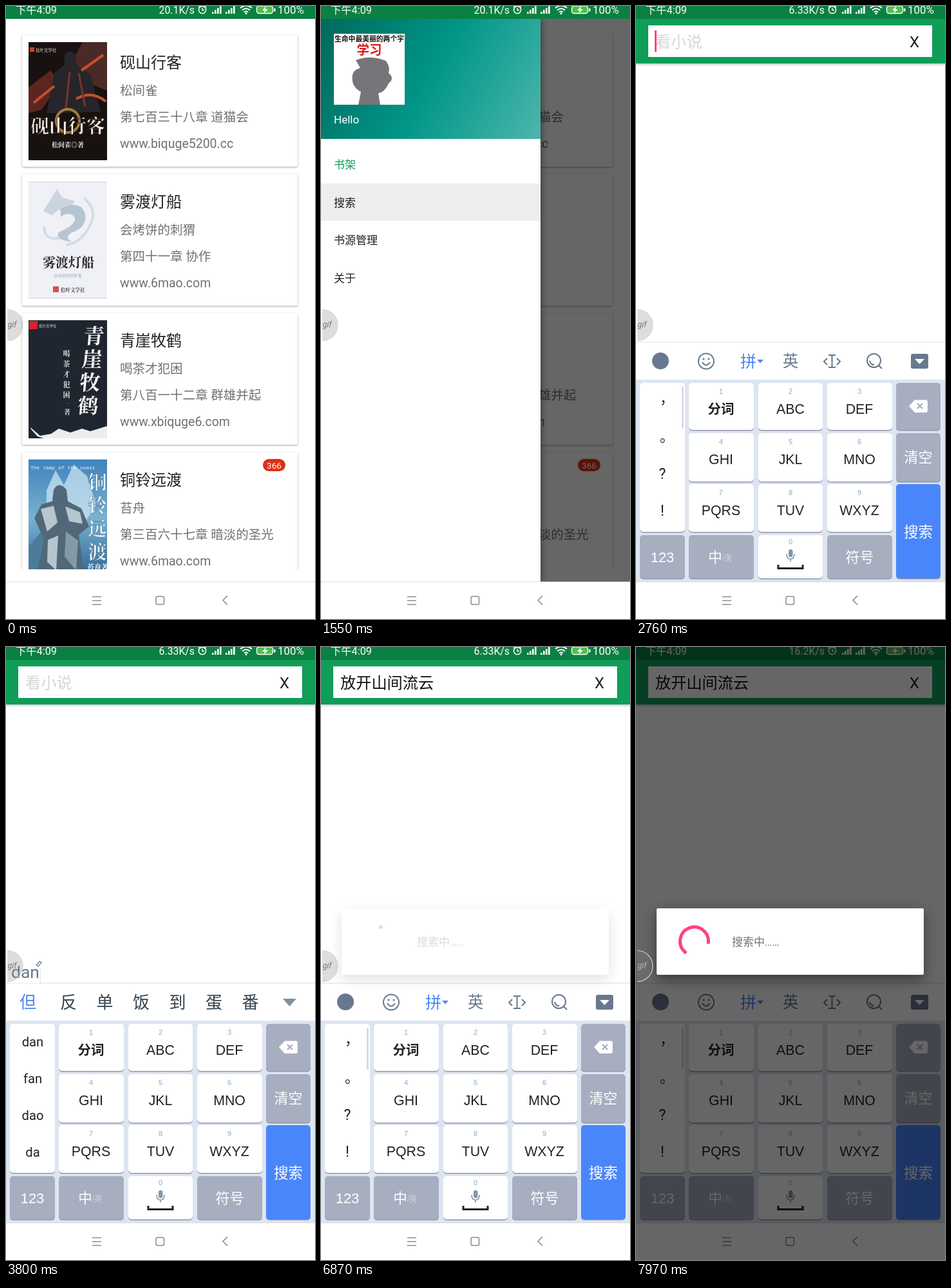
Write an HTML page that moves like this. It is 480 px wide and 950 px high and loops after 8 s.

```html
<!DOCTYPE html>
<html lang="zh">
<head>
<meta charset="utf-8">
<title>Reader</title>
<style>
html, body { margin: 0; width: 100%; height: 100%; overflow: hidden; background: #fff; }
svg { display: block; }
#stage { position: absolute; left: 0; top: 0; font-family: Roboto, "Noto Sans CJK SC", "Noto Sans CJK", sans-serif; }
.card { filter: drop-shadow(0 1px 1.5px rgba(0,0,0,.36)); }
.serif { font-family: "Noto Serif", "Noto Serif CJK SC", "Noto Sans CJK SC", serif; font-weight: 700; }
.mono { font-family: "Liberation Mono", monospace; }
.keys { font-family: "Liberation Sans", "Noto Sans CJK SC", sans-serif; }
.dialog { filter: drop-shadow(0 7px 10px rgba(0,0,0,.45)); }
.bar { filter: drop-shadow(0 1px 2px rgba(0,0,0,.35)); }
.side { filter: drop-shadow(2px 0 5px rgba(0,0,0,.4)); }
</style>
</head>
<body>
<svg id="stage" width="480" height="950" viewBox="0 0 480 950"></svg>
<script>
const LOOP = 8000;
const GREEN = '#0f9d58', PINK = '#ff4081', SLATE = '#68788e', BLUE = '#4a86fb', GREY = '#a7aec0';
const QUERY = '放开山间流云';
const DRAWER = 341;

// moments at which the screen is refreshed: from, to, count
const SPANS = [[0, 0, 1], [200, 680, 6], [1450, 1880, 6], [1960, 2160, 3], [2270, 2270, 1],
  [2550, 2760, 3], [3040, 3330, 4], [3490, 4290, 10], [4470, 4470, 1], [4870, 4870, 1],
  [5190, 5240, 2], [5740, 5900, 3], [6380, 6470, 3], [6870, 7670, 9], [7770, 7970, 3]];
const TICKS = SPANS.flatMap(([a, b, n]) =>
  Array.from({ length: n }, (_, i) => n < 2 ? a : Math.round(a + (b - a) * i / (n - 1))));

// press time, key, composition, candidates, syllables
const TYPED = [
  [3040, 'DEF', 'd', '的 到 大 等 都 多 对', 'd e f'],
  [3490, 'ABC', 'da', '大 打 发 达 法 答 额', 'da fa e d'],
  [3660, 'MNO', 'dan', '但 反 单 饭 到 蛋 番', 'dan fan dao da'],
  [3840, 'GHI', 'dang', '当 放 方 房 党 挡 防', 'dang fang dan dao'],
  [4020, 'JKL', "fang'k", '放开 方块 房卡 放宽 反抗', 'dang fang dan dao'],
  [4200, 'ABC', "fang'ka", '放开 房卡 翻来 单卡 方卡', 'dang fang dan dao'],
  [4290, 'GHI', "fang'kai", '放开 翻来 房开 方凯 单开', 'dang fang dan dao']
];

const clamp = x => Math.max(0, Math.min(1, x));
const easeOut = x => 1 - (1 - clamp(x)) ** 3;
const within = (t, a, b) => t >= a && t < b;
const text = (x, y, size, fill, s, more = '') =>
  `<text x="${x}" y="${y}" font-size="${size}" fill="${fill}" ${more}>${s}</text>`;
const mid = (x, y, size, fill, s, more = '') => text(x, y, size, fill, s, 'text-anchor="middle" ' + more);
const rect = (x, y, w, h, fill, more = '') =>
  `<rect x="${x}" y="${y}" width="${w}" height="${h}" fill="${fill}" ${more}/>`;
const path = (d, fill, more = '') => `<path d="${d}" fill="${fill}" ${more}/>`;
const line = (d, color, w = 2, more = '') => path(d, 'none', `stroke="${color}" stroke-width="${w}" ${more}`);
const circle = (x, y, r, fill, more = '') => `<circle cx="${x}" cy="${y}" r="${r}" fill="${fill}" ${more}/>`;
const column = (x, y, gap, size, fill, s, more = '') =>
  [...s].map((c, i) => mid(x, y + i * gap, size, fill, c, more)).join('');

// fast-out-slow-in, bezier (.4, 0, .2, 1)
function smooth(x) {
  let lo = 0, hi = 1;
  for (let i = 0; i < 24; i++) {
    const u = (lo + hi) / 2, v = 1 - u;
    if (1.2 * u * v * v + .6 * u * u * v + u * u * u < x) lo = u; else hi = u;
  }
  return lo * lo * (3 - 2 * lo);
}

const COVERS = [
  rect(0, 0, 122, 183, '#17110f') +
  path('M122 0V75L88 62L70 25L84 0Z', '#4a2a26') +
  path('M0 70L34 44L50 62L20 105L0 110Z', '#5c2620') +
  path('M28 110L40 48L55 36L56 20Q64 8 73 20L74 36L96 50L112 108Z', '#25252b') +
  line('M8 94L40 68M82 44L116 20M74 88Q98 74 120 92', '#c8502b', 4) +
  line('M64 46L58 104M78 48L88 100', '#77352b', 3) +
  circle(61, 122, 18, 'none', 'stroke="#a5793f" stroke-width="4"') +
  rect(2, 8, 7, 7, '#d33a2c') + text(11, 14.5, 6.5, '#e5d5b4', '拾叶文学社') +
  mid(61, 141, 29, '#f8f2ea', '砚山行客', 'class="serif" stroke="#2b1712" stroke-width=".7"') +
  mid(61, 163, 10, '#eee', '松间雀◎著', 'class="serif"'),

  rect(0, 0, 122, 183, '#eff1f6') + rect(0, 0, 122, 2, '#dfe3ea') + rect(0, 180, 122, 2, '#e1e4ea') +
  path('M23 46L34 29L44 12L52 25L72 31L64 43L46 45L36 53Z', '#cbd5df') +
  path('M50 42Q82 28 88 51Q91 72 68 79Q54 88 68 94Q39 91 47 79Q82 64 68 52Q57 48 50 56Z', '#b7c5d1') +
  line('M86 26Q106 44 98 63Q85 95 58 99M24 70Q24 92 48 88', '#d3dce5', 4) +
  mid(62, 133, 20, '#222', '雾渡灯船', 'class="serif"') +
  mid(61, 148, 6, '#aaaeb6', '会烤饼的刺猬 著') +
  rect(38, 163, 9, 9, '#cf5149') + text(50, 171, 7.5, '#444', '拾叶文学社', 'class="serif"'),

  rect(0, 0, 122, 183, '#20262f') +
  rect(1, 1, 13, 13, '#d9202a') + text(16, 11, 5.5, '#d6d8dc', '拾叶文学社') +
  column(96, 36, 36, 32, '#f6f6f6', '青崖牧鹤', 'class="serif" transform="skewX(-5) translate(8 0)"') +
  column(59, 56, 16, 11, '#e1e1e1', '喝茶才犯困', 'class="serif"') +
  mid(60, 132, 9, '#ddd', '·') + mid(60, 146, 10, '#ddd', '著', 'class="serif"') +
  path('M3 166L18 179L35 176L47 168L65 174L83 168L96 172L122 164V183H23L14 180L4 169Z', '#eceeee'),

  rect(0, 0, 122, 183, 'url(#sky)') +
  path('M28 48L42 17L55 40L70 8L91 26L105 70L83 105L28 96Z', '#c9e4ef', 'opacity=".75"') +
  path('M0 135L20 112L42 119L60 183H0Z', '#4c7b99') +
  path('M9 91L20 70L37 65L39 47Q47 33 59 47L61 65L82 76L94 104L78 117L87 183H12L24 125Z', '#526878') +
  path('M19 77L39 72L45 98L29 112ZM57 73L80 82L84 100L63 96ZM30 125L46 118L43 172L29 159Z', '#b5c6cf') +
  path('M58 112L77 126L74 172L56 151Z', '#8299a7') +
  text(3, 15, 8, '#e8f5ff', 'The lamp of the coast', 'class="mono"') +
  column(107, 46, 36, 29, '#f4fbff', '铜铃远渡', 'class="serif" stroke="#457391" stroke-width=".5"') +
  text(91, 171, 11, '#fff', '苔舟著', 'class="serif"')
];
const BOOKS = [
  ['砚山行客', '松间雀', '第七百三十八章 道猫会', 'www.biquge5200.cc'],
  ['雾渡灯船', '会烤饼的刺猬', '第四十一章 协作', 'www.6mao.com'],
  ['青崖牧鹤', '喝茶才犯困', '第八百一十二章 群雄并起', 'www.xbiquge6.com'],
  ['铜铃远渡', '苔舟', '第三百六十七章 暗淡的圣光', 'www.6mao.com']
];

const card = ([title, author, chapter, site], i) => `<g transform="translate(25 ${45 + 215.5 * i})">
  ${rect(0, 0, 428, 204, '#fff', 'rx="2" class="card"')}
  <svg x="10" y="11" width="122" height="183">${COVERS[i]}</svg>
  ${text(152, 51, 24, '#212121', title)}${text(152, 93, 19.5, '#707070', author)}
  ${text(152, 134, 19.5, '#707070', chapter)}${text(152, 175, 19.5, '#707070', site)}</g>`;

// the list has no background of its own, so the page below shows between cards
function shelf() {
  return `<g clip-path="url(#list)">${BOOKS.map(card).join('')}` +
    rect(399, 702, 35, 19, '#df2f17', 'rx="9.5"') + mid(416.5, 716.5, 13.5, '#fff', '366') + '</g>';
}

function searchPage() {
  return rect(0, 20, 480, 873, '#fff') + rect(0, 20, 480, 69, GREEN, 'class="bar"') +
    rect(19, 30, 441, 49, '#fff') + mid(432.5, 64, 24, '#212121', 'X') + '<g id="field"></g>';
}

function drawer() {
  const items = ['书架', '搜索', '书源管理', '关于'];
  return rect(0, 20, DRAWER, 872, '#fff', 'class="side"') + rect(0, 20, DRAWER, 186, 'url(#teal)') +
    rect(20, 43, 110, 110, '#fff') +
    path('M54 84Q76 75 101 85Q108 95 105 104Q115 112 105 120Q99 134 89 135L92 153H58L62 133Q46 125 49 106Q52 98 61 96Z', '#77757a') +
    mid(75, 55, 10.8, '#111', '生命中最美丽的两个字', 'font-weight="700"') +
    mid(75, 75, 19.5, '#e01818', '学习', 'font-weight="700"') +
    text(20, 181.5, 17, '#fff', 'Hello') + rect(0, 275, DRAWER, 58, '#000', 'id="ripple"') +
    items.map((s, i) => text(20, 252 + 58.6 * i, 17, i ? '#212121' : GREEN, s)).join('');
}

const COLS = [[6, 70], [82, 101], [190, 100], [297, 101], [404, 69]];
const ROWS = [[584, 73], [662, 75], [741, 74], [820, 67]];
function keyBox(c, r, fill, span = 1) {
  const [x, w] = COLS[c], y = ROWS[r][0], [y2, h2] = ROWS[r + span - 1];
  const h = y2 + h2 - y;
  return rect(x, y + 1.5, w, h, '#8f99ad', 'rx="5"') + rect(x, y, w, h, fill, 'rx="5"');
}
const LETTERS = ['分词', 'ABC', 'DEF', 'GHI', 'JKL', 'MNO', 'PQRS', 'TUV', 'WXYZ'];

function keyboard() {
  let s = rect(0, 521, 480, 58, '#fff') + rect(0, 520.5, 480, 1, '#d9dee6') + rect(0, 579, 480, 314, '#dde5f1');
  s += keyBox(0, 0, '#fff', 3) + keyBox(4, 0, GREY) + keyBox(4, 1, GREY) + keyBox(4, 2, BLUE, 2);
  s += keyBox(0, 3, GREY) + keyBox(1, 3, GREY) + keyBox(2, 3, '#fff') + keyBox(3, 3, GREY);
  LETTERS.forEach((name, i) => {
    const c = 1 + i % 3, r = Math.floor(i / 3), x = COLS[c][0] + 50, y = ROWS[r][0];
    s += keyBox(c, r, '#fff') + mid(x, y + 16.5, 11, '#98a5bd', i + 1) +
      mid(x, y + 47.5, i ? 21.3 : 20.5, '#222', name, i ? '' : 'font-weight="700"');
  });
  s += path('M424 620L433 610.5H450Q453 610.5 453 613V627Q453 630 450 630H433Z', '#fff') +
    line('M437 616L445 624M445 616L437 624', GREY, 2.2);
  s += mid(438.5, 707, 22, '#fff', '清空') + mid(438.5, 823, 22.5, '#fff', '搜索') +
    mid(41, 861.5, 22, '#fff', '123') + mid(123, 862, 21.5, '#fff', '中', 'font-weight="500"') +
    text(134, 860, 12, '#d0d5df', '/英') + mid(347.5, 862, 22, '#fff', '符号') +
    mid(240, 834, 11, '#98a5bd', '0');
  s += rect(237, 842, 6.5, 12, '#8596ac', 'rx="3.2"') + line('M234 849Q234 857 240 857Q246 857 246 849M240 857V861', '#8596ac', 1.6) +
    line('M221 866V871.5H259V866', '#222', 3);
  return `<g class="keys">${s}</g><g id="press"></g><g id="side"></g><g id="strip"></g>`;
}

const HIDE = rect(427, 539, 27, 23, SLATE, 'rx="3"') + path('M433 547H448L440.5 555Z', '#fff');
const MORE = path('M430 545H451L440.5 557Z', '#7d92a0');
const TOOLS = circle(38, 550, 13, SLATE) +
  circle(109, 550.5, 12, 'none', `stroke="${SLATE}" stroke-width="2"`) +
  circle(105, 547, 1.6, SLATE) + circle(113, 547, 1.6, SLATE) + line('M103 552Q109 561 115 552', SLATE) +
  mid(174.5, 559.5, 25, BLUE, '拼') + path('M188 548H198L193 553.5Z', BLUE) + mid(240, 559, 24.5, SLATE, '英') +
  line('M299 541H310M304.5 541V560M299 560H310M297 546L292 551L297 556M312 546L317 551L312 556', SLATE) +
  circle(369.5, 549.5, 10.5, 'none', `stroke="${SLATE}" stroke-width="2"`) +
  line('M363 550Q364 556 370 556M377 557L382 562', SLATE) + HIDE;

function candidates(list, button) {
  let x = 21;
  return list.split(' ').map((s, i) => {
    const out = text(x, 560, 26, i ? '#34434f' : BLUE, s);
    x += s.length * 26 + (i ? 30.5 : 37);
    return out;
  }).join('') + button;
}

function statusBar() {
  const bars = x => [0, 1, 2, 3].map(i => rect(x + i * 4, 9 - i * 3, 2.6, 3 + i * 3, '#fff')).join('');
  return rect(0, 0, 480, 20, '#0b8043') + text(15, 12, 16.3, '#fff', '下午4:09') +
    text(293, 12, 15.8, '#fff', '', 'id="speed" text-anchor="end"') +
    circle(305, 6, 5.6, 'none', 'stroke="#fff" stroke-width="1.5"') +
    line('M305 3V6.5H308M299 2L302 -1M311 2L308 -1', '#fff', 1.4) + bars(320) + bars(341) +
    line('M364 3Q373 -4 382 3M367 6.5Q373 1.5 379 6.5M370 9.5Q373 7 376 9.5', '#fff', 2) + circle(373, 11.5, 1.5, '#fff') +
    rect(389.5, 0, 25, 11.5, '#4cc04c', 'rx="3.5" stroke="#fff" stroke-width="1.4"') +
    rect(416, 3.5, 2.5, 5, '#fff', 'rx="1"') + path('M404 0L398 7H402L400 12L407 5H403Z', '#fff') +
    text(422, 12, 16.9, '#fff', '100%');
}

function navBar() {
  return rect(0, 892, 480, 58, '#fff') + rect(0, 892, 480, 1, '#ddd') +
    line('M134 915.5H148M134 921.5H148M134 927.5H148', '#8a8a8a', 1.4) +
    rect(233, 915, 12.5, 12.5, 'none', 'rx="2.5" stroke="#8a8a8a" stroke-width="1.5"') +
    line('M344 914L337 921L344 928', '#8a8a8a', 1.5);
}

const stage = document.getElementById('stage');
stage.innerHTML = `<defs>
  <linearGradient id="teal" gradientUnits="userSpaceOnUse" x1="341" y1="206" x2="0" y2="20">
    <stop stop-color="#4db6ac"/><stop offset=".5" stop-color="#009688"/><stop offset="1" stop-color="#00695c"/></linearGradient>
  <linearGradient id="sky" x2="0" y2="1"><stop stop-color="#3f83bd"/><stop offset=".5" stop-color="#78b2d1"/><stop offset="1" stop-color="#2e6492"/></linearGradient>
  <clipPath id="list">${rect(0, 20, 480, 853, '#000')}</clipPath></defs>
  ${rect(0, 0, 480, 950, '#fff')}<g id="search">${searchPage()}</g>
  <g id="shelf">${shelf()}</g>${rect(0, 20, 480, 872, '#000', 'id="scrim"')}
  <g id="drawer">${drawer()}</g><g id="keyboard">${keyboard()}</g>${statusBar()}${navBar()}
  ${rect(0, 0, 480, 950, '#000', 'id="dim"')}
  <g id="dialog">${rect(32, 405, 415, 103, '#fff', 'rx="2" class="dialog"')}
    ${text(149, 463, 17, '#757575', '搜索中……')}${line('', PINK, 5, 'id="arc" stroke-linecap="square"')}</g>
  <path d="M2 470A24.5 24.5 0 0 1 2 519Z" fill="rgba(128,124,128,.26)"/>
  ${line('M2 470.5A24 24 0 0 1 2 518.5', 'rgba(215,215,215,.9)', 1.2)}
  ${text(2.5, 498, 12.5, '#777', 'gif', 'id="gif" font-style="italic"')}`;

const el = {};
stage.querySelectorAll('[id]').forEach(n => el[n.id] = n);
const set = (id, name, value) => el[id].setAttribute(name, value);
const show = (id, on) => set(id, 'visibility', on ? 'visible' : 'hidden');

// swiped open, later settles shut after a tap
function drawerOpen(t) {
  if (t < 1766) return t < 200 ? 0 : smooth(clamp((t - 120) / 560));
  return (1 - clamp((t - 1766) / 512)) ** 5;
}

function drawPages(t) {
  const open = t < 2270 ? drawerOpen(t) : 0, fade = clamp((t - 1830) / 440);
  show('drawer', open > 0);
  set('drawer', 'transform', `translate(${DRAWER * (open - 1)} 0)`);
  set('scrim', 'opacity', .6 * open);
  set('ripple', 'opacity', within(t, 1450, 1880) ? .1 * clamp((t - 1400) / 200) : 0);
  set('shelf', 'opacity', 1 - fade);
  set('search', 'opacity', fade);
}

function drawInput(t) {
  const value = t < 5240 ? '' : t < 5820 ? QUERY.slice(0, 2) : QUERY;
  const blink = [[2550, 3330], [3840, 4290], [4870, 5740], [5820, 6380]].some(([a, b]) => within(t, a, b));
  el.field.innerHTML = text(30, 64, 24.2, value ? '#111' : '#d6d6d6', value || '看小说') +
    (blink ? rect(29 + 24.2 * value.length, 38, 3, 33, PINK) : '');
}

function drawKeyboard(t) {
  const enter = clamp((t - 2490) / 260);
  show('keyboard', t >= 2550);
  set('keyboard', 'opacity', easeOut(enter));
  set('keyboard', 'transform', `translate(0 ${80 * (1 - easeOut(enter))})`);

  let now = null, pressed = '';
  TYPED.forEach((row, i) => {
    const shown = row[0] + (i === TYPED.length - 1 ? 180 : 80);
    if (within(t, shown, 5240)) now = row;
    if (within(t, row[0], shown)) pressed = row[1];
  });

  const shade = (x, y, w, h) => rect(x, y, w, h, '#4a5a78', 'rx="5" opacity=".25"');
  let press = '';
  if (pressed) {
    const i = LETTERS.indexOf(pressed), [x, w] = COLS[1 + i % 3], [y, h] = ROWS[Math.floor(i / 3)];
    press = shade(x, y, w, h);
  }
  if (within(t, 6380, 6470)) press = shade(404, 741, 69, 146);
  el.press.innerHTML = press;

  el.side.innerHTML = now
    ? now[4].split(' ').map((s, i) => mid(41.5, 619 + 57 * i, 20.2, '#222', s)).join('')
    : mid(48, 616, 22, '#222', '，') + mid(48, 675, 22, '#222', '。') + mid(41, 733, 23, '#222', '?') +
      mid(41, 790, 23, '#222', '!') + rect(71, 590, 3, 65, '#d6d9df', 'rx="1.5"');

  let strip = TOOLS;
  if (now) {
    const w = Math.max(40, now[2].length * 12.4 + 16);
    strip = candidates(now[3], MORE) + rect(0, 484, w, 37, '#fff', 'opacity=".75"') +
      line(`M${w} 497V521`, '#d9dfe8', 1) + text(8, 513, 26.5, SLATE, now[2]) +
      line(`M${w - 6} 493L${w - 1} 487L${w + 2} 489L${w - 3} 495Z`, SLATE, 1.2);
  } else if (within(t, 5240, 5820)) strip = candidates(QUERY.slice(2) + ' 了 手 我 你', HIDE);
  el.strip.innerHTML = strip;
}

function drawDialog(t) {
  show('dialog', t >= 6870);
  set('dialog', 'opacity', easeOut((t - 6825) / 450));
  set('dim', 'opacity', .6 * easeOut((t - 6870) / 800));
  set('gif', 'fill', t > 7000 ? '#b4b4b4' : '#777');

  const ms = 25 + Math.max(0, t - 6870) * .705, f = ms / 1333;
  const tail = 270 * smooth(clamp(f * 2 - 1)), head = 270 * smooth(clamp(f * 2));
  const turn = ms / 4444 * 720 + 90 * f - 90;
  const at = deg => {
    const a = (turn + deg) * Math.PI / 180;
    return `${90.5 + 22 * Math.cos(a)} ${456 + 22 * Math.sin(a)}`;
  };
  set('arc', 'd', `M${at(tail)}A22 22 0 ${head - tail > 180 ? 1 : 0} 1 ${at(head)}`);
}

let last = -1;
function frame(ms) {
  const now = ms % LOOP;
  let t = 0;
  for (const tick of TICKS) if (tick <= now) t = tick;
  if (t !== last) {
    last = t;
    drawPages(t);
    drawInput(t);
    drawKeyboard(t);
    drawDialog(t);
    el.speed.textContent = t < 2550 ? '20.1K/s' : t < 7570 ? '6.33K/s' : '16.2K/s';
  }
  requestAnimationFrame(frame);
}
frame(0);
</script>
</body>
</html>
```
